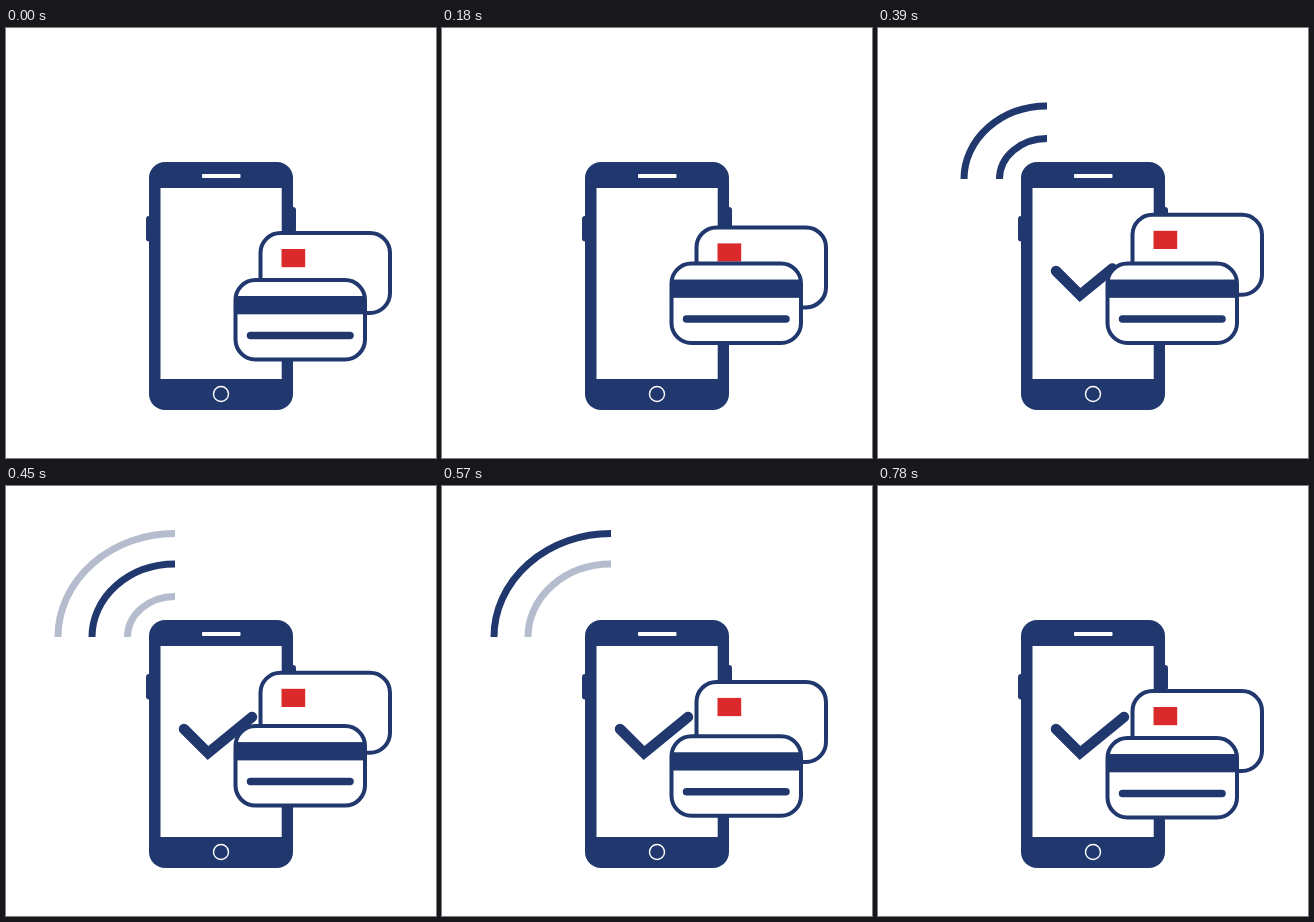
These frames come from a looping animation (430x430 px, 1.53 s). An HTML page:

```html
<!DOCTYPE html>
<html lang="en">
<head>
<meta charset="utf-8">
<title>Mobile payment</title>
<style>
  html, body { margin: 0; width: 100%; height: 100%; overflow: hidden; background: #fff; }
  svg { display: block; width: 100%; height: 100%; }
  .navy { fill: #20386d; }
  .white { fill: #fff; }
  .line { fill: none; stroke: #20386d; }
  .card { fill: #fff; stroke: #20386d; stroke-width: 4; }
</style>
</head>
<body>
<svg viewBox="0 0 430 430">
  <g class="line" stroke-width="7">
    <path class="arc" d="M121.5 151A47.5 40.5 0 0 1 169 110.5"/>
    <path class="arc" d="M86 151A83 73 0 0 1 169 78"/>
    <path class="arc" d="M52 151A117 103.5 0 0 1 169 47.5"/>
  </g>

  <g class="navy">
    <rect x="140" y="188" width="10" height="25.5" rx="3"/>
    <rect x="280" y="179" width="10" height="25.5" rx="3"/>
    <rect x="143" y="134" width="144" height="248" rx="16"/>
  </g>
  <rect class="white" x="154.5" y="160" width="121.2" height="191"/>
  <rect class="white" x="196" y="146" width="38.5" height="4" rx="1"/>
  <circle cx="215" cy="366" r="7.5" fill="none" stroke="#fff" stroke-width="1.4"/>

  <path id="check" class="line" d="M178 243L202 267L246 231" stroke-width="10.5" stroke-linecap="round"/>

  <g id="back">
    <rect class="card" x="254.5" y="205" width="129.5" height="80" rx="20"/>
    <rect x="275.5" y="221" width="23.7" height="18.2" fill="#db2a2b"/>
  </g>
  <g id="front">
    <rect class="card" x="229.5" y="252" width="129.5" height="79.5" rx="20"/>
    <rect class="navy" x="229.5" y="268" width="129.5" height="18.3"/>
    <path class="line" d="M244.5 307.5H344" stroke-width="7.5" stroke-linecap="round"/>
  </g>
</svg>
<script>
  const LOOP = 1530, STEP = 30, MOVE_END = 780, LIFT = 18.2;
  const byId = id => document.getElementById(id);
  const check = byId("check"), back = byId("back"), front = byId("front");
  const arcs = [...document.querySelectorAll(".arc")];
  const checkLength = check.getTotalLength();

  const ramp = (t, a, b) => Math.min(1, Math.max(0, (t - a) / (b - a)));
  const ease = (t, a, b) => (1 - Math.cos(Math.PI * ramp(t, a, b))) / 2;

  // Rise from a to b, stay up, then sink from c to d.
  function hop(el, t, a, b, c, d) {
    const y = -LIFT * (ease(t, a, b) - ease(t, c, d));
    el.setAttribute("transform", `translate(0 ${y.toFixed(2)})`);
  }

  function draw(time) {
    const t = Math.min(MOVE_END, Math.floor((time % LOOP) / STEP) * STEP);

    hop(front, t, 0, 225, 330, 630);
    hop(back, t, 90, 330, 450, 690);

    const drawn = checkLength * ramp(t, 190, 430);
    check.style.visibility = drawn ? "visible" : "hidden";
    check.setAttribute("stroke-dasharray", `${drawn} ${checkLength * 2}`);

    // Each wave fades in and out a little after the one inside it.
    arcs.forEach((arc, i) => {
      const start = 180 + 120 * i;
      const end = i === 2 ? 660 : start + 210;
      const fade = i === 2 ? 120 : 90;
      arc.setAttribute("opacity", ramp(t, start, start + 90) - ramp(t, end, end + fade));
    });
  }

  const begin = performance.now();
  function tick() {
    draw(performance.now() - begin);
    requestAnimationFrame(tick);
  }
  draw(0);
  requestAnimationFrame(tick);
</script>
</body>
</html>
```
